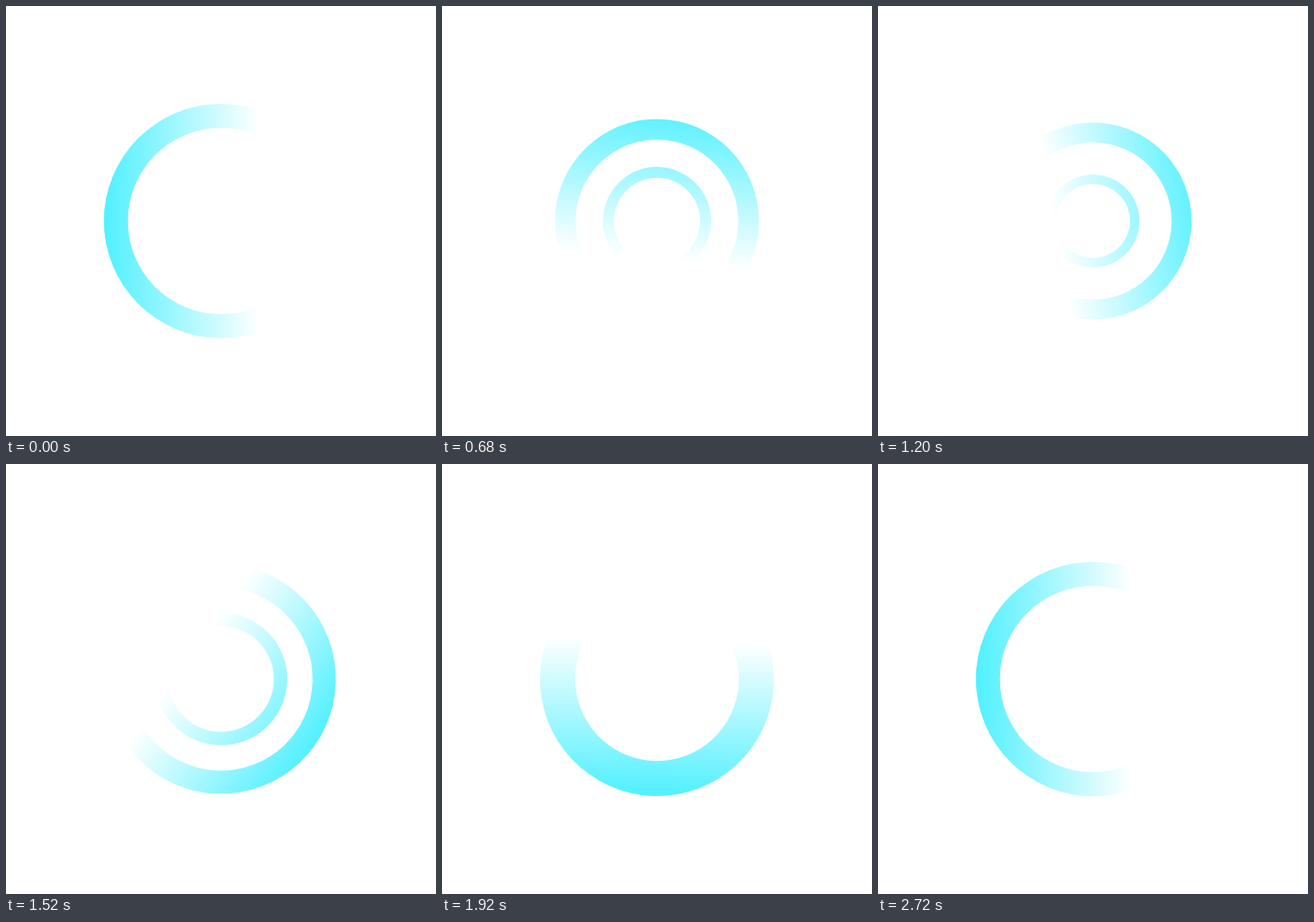
Write an HTML page with a canvas that moves like this. It is 500 by 500 pixels and loops after 2800 ms.

```html
<!DOCTYPE html>
<html>
<head>
<meta charset="utf-8">
<style>
  html, body { margin: 0; width: 100%; height: 100%; overflow: hidden; background: #fff; }
  canvas { display: block; }
</style>
</head>
<body>
<canvas id="stage" width="500" height="500"></canvas>
<script>
const ctx = document.getElementById('stage').getContext('2d');
const LOOP = 2800, STEP = 40, LAST = 2720;
const FULL = 136, HOLE = 0.798, CENTER = 250;

const ease = u => (1 - Math.cos(Math.PI * Math.min(1, Math.max(0, u)))) / 2;
const tween = (t, start, end, from, to) => from + (to - from) * ease((t - start) / (end - start));

// Smooth monotone curve through [time, value] points, flat at both ends.
function curve(points, t) {
  const slope = i => (points[i + 1][1] - points[i][1]) / (points[i + 1][0] - points[i][0]);
  const tangent = i => {
    if (i === 0 || i === points.length - 1) return 0;
    const a = slope(i - 1), b = slope(i);
    return 2 * a * b / (a + b);
  };
  const last = points.length - 1;
  if (t >= points[last][0]) return points[last][1];
  let i = 0;
  while (t >= points[i + 1][0]) i++;
  const [t0, v0] = points[i], [t1, v1] = points[i + 1];
  const h = t1 - t0, u = (t - t0) / h, w = 1 - u;
  return w * w * (1 + 2 * u) * v0 + u * u * (3 - 2 * u) * v1
    + h * u * w * (w * tangent(i) - u * tangent(i + 1));
}

function outerRadius(t) {
  return t < 980 ? tween(t, 290, 950, FULL, 108.8) : tween(t, 1005, 1645, 108.8, FULL);
}

const GROWTH = [[930, 23], [1200, 54], [1520, 77], [1920, 119.3], [2280, FULL]];
function innerRadius(t) {
  return t < 930 ? tween(t, 310, 930, FULL, 23.5) : curve(GROWTH, t);
}

function turn(t) {
  const late = Math.max(0, t - 1920);
  return 180 + t * 272 / 1920 - late * late * 25.33 / 640000;
}

function ring(radius) {
  ctx.beginPath();
  ctx.arc(0, 0, radius, 0, Math.PI * 2);
  ctx.arc(0, 0, radius * HOLE, 0, Math.PI * 2, true);
  ctx.fill();
}

function draw(t) {
  ctx.setTransform(1, 0, 0, 1, 0, 0);
  ctx.fillStyle = '#fff';
  ctx.fillRect(0, 0, 500, 500);
  ctx.translate(CENTER, CENTER);
  ctx.rotate(turn(t) * Math.PI / 180);
  const shade = ctx.createLinearGradient(-45, 0, FULL, 0);
  shade.addColorStop(0, '#fff');
  shade.addColorStop(1, 'rgb(80,240,255)');
  ctx.fillStyle = shade;
  ring(outerRadius(t));
  ring(innerRadius(t));
}

function tick() {
  const t = performance.now() % LOOP;
  draw(Math.min(LAST, Math.floor(t / STEP) * STEP));
  requestAnimationFrame(tick);
}
tick();
</script>
</body>
</html>
```
